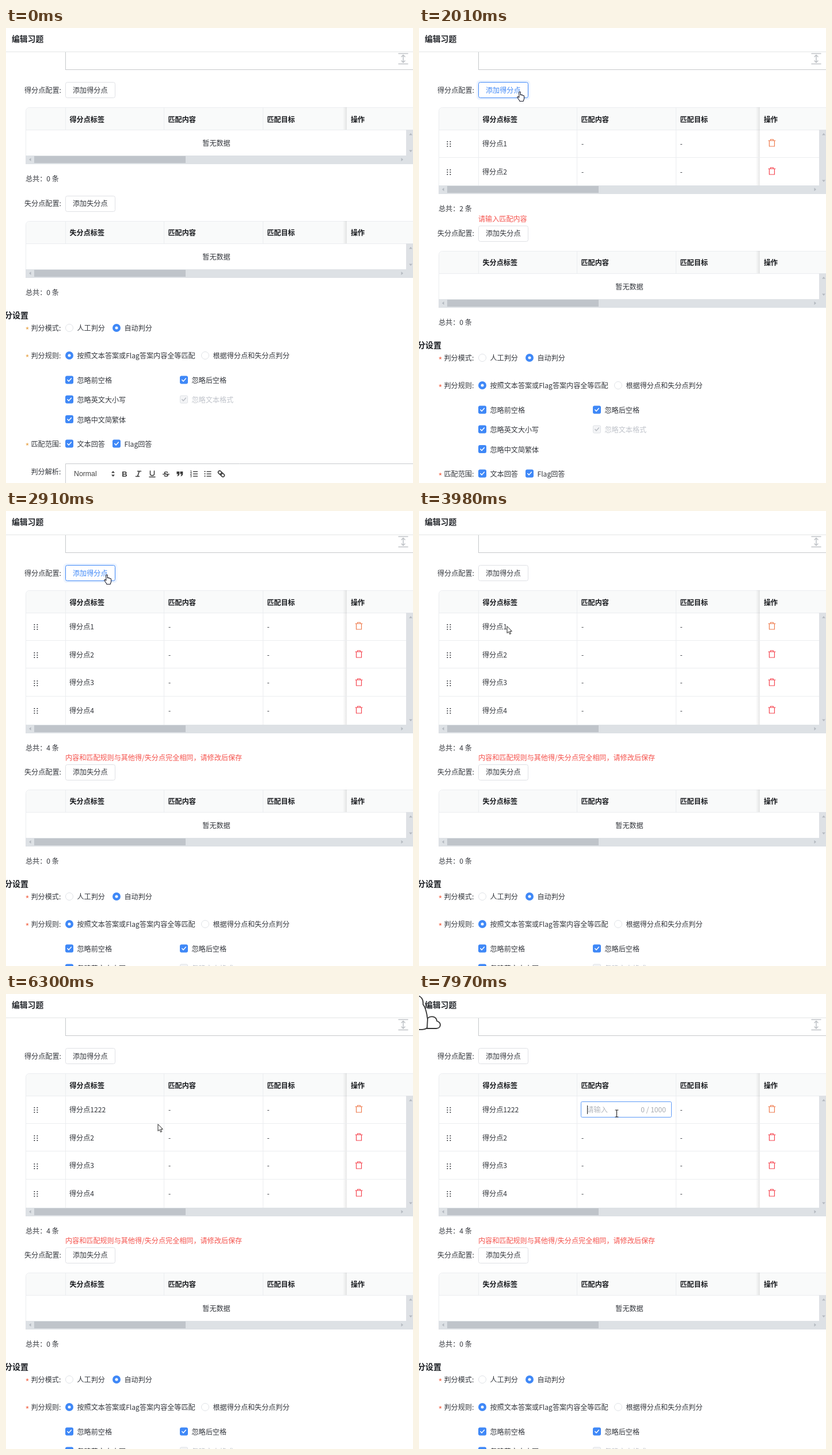
An HTML page with a canvas for the animation above (8000 ms loop, 707 px wide and 792 px high).

```html
<!DOCTYPE html>
<html lang="zh-CN">
<head>
<meta charset="utf-8">
<style>
html, body { margin: 0; width: 100%; height: 100%; overflow: hidden; background: #fff; }
canvas { display: block; }
</style>
</head>
<body>
<canvas id="stage" width="707" height="792"></canvas>
<script>
const c = document.getElementById('stage').getContext('2d');
const LOOP = 8000, SIZE = 12.1, ROW = 48.65, EMPTY = 45.2;
const BLUE = '#3f88f7', INK = '#34373d', LINE = '#ebedf0';
const SANS = '"Noto Sans CJK SC", "Noto Sans CJK", "Noto Sans", sans-serif';

// Moments of the story, in ms
const CLICKS = [1640, 1895, 2250, 2790];
const ERROR_AT = 1780, DUPLICATE_AT = 2060;
const EDITS = [
  { x: 110, open: 3985, ime: 4795, close: 5900 },
  { x: 281.5, open: 7325, ime: 7835, close: LOOP },
];
const KEYS = [5130, 5260, 5390];

// Pointer hot spot: time, x, y
const PATH = [
  [170, 449, 5], [480, 335, 62], [740, 188, 136], [940, 160, 112], [1050, 160, 112],
  [1300, 153, 107], [1640, 153, 107], [1850, 175, 111], [2960, 175, 111], [3300, 166, 165],
  [3580, 153, 209], [3620, 153, 209], [3680, 153, 201], [4150, 153, 201], [4740, 191.5, 200.5],
  [5410, 191.5, 200.5], [5560, 259, 226], [5800, 290, 248], [5950, 290, 248], [6280, 264, 227],
  [6330, 264, 227], [6400, 268, 209], [6800, 364, 203], [7210, 343.5, 208], [8000, 343.5, 208],
];

function pointer(t) {
  const i = PATH.findIndex(p => p[0] > t);
  if (i < 1) return null;
  const [a, b] = [PATH[i - 1], PATH[i]];
  let k = (t - a[0]) / (b[0] - a[0]);
  k = k * k * (3 - 2 * k);
  return { x: a[1] + (b[1] - a[1]) * k, y: a[2] + (b[2] - a[2]) * k };
}
const within = (p, x, y, w, h) => p && p.x >= x && p.x <= x + w && p.y >= y && p.y <= y + h;

// Drawing helpers
function rect(x, y, w, h, fill) {
  c.fillStyle = fill;
  c.fillRect(x, y, w, h);
}
function text(s, x, y, { color = INK, size = SIZE, weight = 350, align = 'left', font = SANS } = {}) {
  c.font = `${weight} ${size}px ${font}`;
  c.textAlign = align;
  c.fillStyle = color;
  c.fillText(s, x, y + size * .38);
}
function box(x, y, w, h, r, fill, stroke, width = 1) {
  c.beginPath();
  c.roundRect(x, y, w, h, r);
  paint(fill, stroke, width);
}
function circle(x, y, r, fill, stroke) {
  c.beginPath();
  c.arc(x, y, r, 0, 7);
  paint(fill, stroke, 1);
}
function path(d, x, y, fill, stroke, width = 1) {
  c.save();
  c.translate(x, y);
  c.lineWidth = width;
  c.lineJoin = c.lineCap = 'round';
  const p = new Path2D(d);
  if (fill) { c.fillStyle = fill; c.fill(p); }
  if (stroke) { c.strokeStyle = stroke; c.stroke(p); }
  c.restore();
}
function paint(fill, stroke, width) {
  if (fill) { c.fillStyle = fill; c.fill(); }
  if (stroke) { c.strokeStyle = stroke; c.lineWidth = width; c.stroke(); }
}

function button(label, y, hover, wave) {
  if (wave > 0 && wave < 1) {
    const g = 2 + 4 * wave;
    box(103 - g, y - 14 - g, 87 + 2 * g, 28 + 2 * g, 4 + g / 2, `rgba(63,136,247,${.12 * (1 - wave)})`);
  }
  box(103.5, Math.round(y - 14) + .5, 86, 27, 3, '#fff', hover ? BLUE : '#dfe1e5');
  text(label, 116, y, { color: hover ? BLUE : INK });
}

function trash(y, color) {
  path('M-6 -4.5H6M-2.5 -4.5V-6.5H2.5V-4.5M-4.5 -4.5V5.5H4.5V-4.5', 613, y, null, color, 1.2);
}

function scrollbars(top, bottom) {
  rect(695, top, 12, bottom - top, '#dee1e5');
  rect(34, bottom, 673, 15, '#dde1e5');
  rect(49, bottom + 1, 263, 12, '#bfc4ca');
  const grey = '#b4b9c0', mid = bottom + 7;
  path('M-3 1.5L0 -2L3 1.5Z', 703, top + 8, grey);
  path('M-3 -1.5L0 2L3 -1.5Z', 703, bottom - 8, grey);
  path('M1.5 -3L-2 0L1.5 3Z', 42, mid, grey);
  path('M-1.5 -3L2 0L-1.5 3Z', 688, mid, grey);
}

// One settings block; y is the centre line of its label
function section(kind, y, rows, hover, wave) {
  text(kind + '分点配置:', 32, y);
  button('添加' + kind + '分点', y, hover, wave);
  const head = Math.round(y + 30), top = head + 39;
  const bottom = Math.round(top + (rows.length ? rows.length * ROW : EMPTY));
  const lineEnd = rows.length ? bottom : top;
  box(34.5, head + .5, 680, bottom - head, [6, 0, 0, 0], '#fff', LINE);
  box(35, head + 1, 680, 38, [6, 0, 0, 0], '#f9fafa');
  rect(35, top, 672, 1, LINE);
  const columns = [[103, kind + '分点标签'], [274, '匹配内容'], [446, '匹配目标']];
  for (const [x, name] of columns) {
    rect(x, head, 1, lineEnd - head, LINE);
    text(name, x + 7.5, y + 51, { weight: 700, color: '#17191d' });
  }
  const shade = c.createLinearGradient(585, 0, 592, 0);
  shade.addColorStop(0, 'rgba(0,0,0,0)');
  shade.addColorStop(1, 'rgba(0,0,0,.09)');
  rect(585, head, 7, lineEnd - head, shade);
  text('操作', 599, y + 51, { weight: 700, color: '#17191d' });

  rows.forEach((name, i) => {
    const mid = top + ROW * (i + .5);
    if (i) rect(35, Math.round(top + ROW * i) - 1, 660, 1, LINE);
    for (let d = 0; d < 6; d++) rect(48.5 + d % 2 * 5, Math.round(mid) - 4 + (d >> 1) * 4, 1.8, 1.8, '#3a3d42');
    text(name, 110, mid);
    text('-', 282, mid);
    text('-', 453.5, mid);
    trash(Math.round(mid) - .5, i ? '#f5444f' : '#ee7b4e');
  });
  if (!rows.length) text('暂无数据', 365.5, y + 92.5, { align: 'center' });
  scrollbars(top, bottom);
  text(`总共：${rows.length} 条`, 34, bottom + 40.4);
  return y + 197.5 + (rows.length ? rows.length * ROW - EMPTY : 0);
}

function radio(label, x, y, on) {
  circle(x, y - .5, on ? 7 : 6.5, on ? BLUE : '#fff', on ? null : '#e0e3e7');
  if (on) circle(x, y - .5, 2.5, '#fff');
  text(label, x + 13.5, y);
}
function check(label, x, y, off) {
  box(x + .5, y - 7.5, 13, 13, 2, off ? '#f3f4f6' : BLUE, off ? '#dfe2e6' : BLUE);
  path('M-3.2 0L-1 2.4L3.4 -2.4', x + 7, y - 1, null, off ? '#b9bdc4' : '#fff', 1.5);
  text(label, x + 20.5, y, { color: off ? '#c0c4cb' : INK });
}

function toolbar(y) {
  const ink = '#3c3c3c', arial = '"Liberation Sans", sans-serif';
  const letter = (s, x) => text(s, x, y + .5, { color: ink, size: 13, weight: 700, font: arial, align: 'center' });
  text('Normal', 118, y - 1, { color: '#444', size: 12.3, weight: 400, font: arial });
  path('M-3 -1.5L0 -5L3 -1.5ZM-3 1.5L0 5L3 1.5Z', 186, y, ink);
  letter('B', 206);
  path('M-1.5 -4.5H4.5M-4.5 4.5H1.5M1.5 -4.5L-1.5 4.5', 230, y, null, ink, 1.6);
  path('M-3.5 -5V0C-3.5 4 3.5 4 3.5 0V-5M-5 5.5H5', 254, y, null, ink, 1.5);
  letter('S', 278);
  rect(272, y, 12, 1.3, ink);
  for (const x of [299, 305])
    path('M-2.5 -4H2.3V0C2.3 2 1 4 -1.5 4.5L-1 2.5L0 .5H-2.5Z', x, y, ink);
  for (let i = -1; i < 2; i++) {
    text(i + 2, 320, y + i * 4.3, { color: ink, size: 5, weight: 700, font: arial });
    rect(325, y + i * 4 - .5, 8, 1.4, ink);
    circle(345.5, y + i * 4, 1.1, ink);
    rect(348.5, y + i * 4 - .5, 8, 1.4, ink);
  }
  c.save();
  c.translate(374, y);
  c.rotate(.75);
  box(-6.5, -2.5, 7.5, 5, 2.5, null, ink, 1.6);
  box(-1, -2.5, 7.5, 5, 2.5, null, ink, 1.6);
  c.restore();
}

function settings(d, star) {
  const label = (s, y) => {
    text('*', 33.5, y + 3.5, { color: star, size: 15 });
    text(s + ':', 43.5, y);
  };
  text('分设置', -3, 499.5 + d, { size: 14, weight: 700, color: '#1c1f24' });
  label('判分模式', 522.5 + d);
  radio('人工判分', 110, 522.5 + d);
  radio('自动判分', 192, 522.5 + d, true);
  label('判分规则', 570.5 + d);
  radio('按照文本答案或Flag答案内容全等匹配', 110, 570.5 + d, true);
  radio('根据得分点和失分点判分', 346, 570.5 + d);
  check('忽略前空格', 103, 613.5 + d);
  check('忽略后空格', 302, 613.5 + d);
  check('忽略英文大小写', 103, 647.5 + d);
  check('忽略文本格式', 302, 647.5 + d, true);
  check('忽略中文简繁体', 103, 682 + d);
  label('匹配范围', 724.5 + d);
  check('文本回答', 103, 724.5 + d);
  check('Flag回答', 185, 724.5 + d);
  text('判分解析:', 43.5, 772.5 + d);
  box(103.5, 758.5 + d, 700, 200, 0, null, '#c9cbce');
  toolbar(776 + d);
}

function header() {
  rect(103, 42, 1, 31, '#c6c8cb');
  rect(103, 72, 604, 1, '#c6c8cb');
  path('M-8 -9H8M-8 9H8M0 -6V6M-3 -3.5L0 -6.5L3 -3.5M-3 3.5L0 6.5L3 3.5', 690, 53.5, null, '#bfc2c6', 1.5);
  rect(0, 41, 707, 1, '#e3e6e6');
  text('编辑习题', 10, 18.5, { size: 13.8, weight: 700, color: '#24272c' });
}

function field(edit, value, limit, hover, t) {
  const { x, ime } = edit, y = 201.5;
  const left = Math.floor(x);
  rect(left + 1, 186, 156, 31, '#fff');
  box(left + .5, 187.5, 157, 27, 2, '#fff', '#5c9af8');
  text(value || '请输入', x + 10, y, { color: value ? INK : '#b3b7be' });
  const end = value ? c.measureText(value).width : 0;
  const phase = ((t - ime) % 1060 + 1060) % 1060;
  if (phase < 530) rect(Math.round(x + 10 + end), 194, 1, 15, '#222');
  text(`${value.length} / ${limit}`, x + 147.5, y, { color: '#a4a8ae', align: 'right' });
  if (value && hover) {
    circle(x + 104.5, 201, 5, '#b9bdc3');
    path('M-1.7 -1.7L1.7 1.7M1.7 -1.7L-1.7 1.7', x + 104.5, 201, null, '#fff', 1.1);
  }
}

function mascot() {
  path('M-4 3C4 3 8 10 7 18C13 26 16 44 15 57C14 62 6 62 -4 62Z', 0, 0, '#fff', '#333', 1.8);
  path('M15 42C20 38 30 38 31 47C40 50 38 60 30 60H14Z', 0, 0, '#fff', '#333', 1.8);
}

const CURSORS = {
  arrow: ['M0 0V11.5L2.7 9L4.6 13.4L6.6 12.5L4.7 8.3H8Z', '#fff', '#222', 1],
  hand: ['M-1.2 10V1.2C-1.2 -.5 1.3 -.5 1.3 1.2V5.5C2 4.8 3.4 5 3.6 6C4.4 5.3 5.6 5.6 5.8 6.6C6.8 6.2 7.6 6.8 7.6 7.8V11.5C7.6 13.5 6.5 14.5 6.2 16.5H0C-.5 14.5 -2.5 12.5 -4 10.3C-4.6 9 -3.4 8 -2.4 8.8Z', '#fff', '#1d2030', 1.1],
  beam: ['M-2.5 -6H-.7L0 -5.5L.7 -6H2.5M0 -5.5V5.5M-2.5 6H-.7L0 5.5L.7 6H2.5', null, '#222', 1.1],
};

function draw(t) {
  rect(0, 0, 707, 792, '#fff');
  const p = pointer(t);
  const count = CLICKS.filter(k => t >= k).length;
  const typed = '得分点1' + '2'.repeat(KEYS.filter(k => t >= k).length);
  const rows = Array.from({ length: count }, (_, i) => i ? '得分点' + (i + 1) : typed);
  const hover = within(p, 103, 94, 87, 28);
  const wave = count ? (t - CLICKS[count - 1]) / 450 : 0;

  header();
  const next = section('得', 108, rows, hover, wave);
  if (t >= ERROR_AT)
    text(t < DUPLICATE_AT ? '请输入匹配内容' : '内容和匹配规则与其他得/失分点完全相同，请修改后保存', 103, next - 25.5, { color: '#f5524c' });
  section('失', next, [], false, 0);
  settings(Math.round(next - 305.5), count ? '#f4694c' : '#e9a64c');

  const edit = EDITS.find(e => t >= e.open && t < e.close);
  const inField = edit && within(p, edit.x, 188, 158, 27);
  if (edit) {
    const first = edit === EDITS[0];
    field(edit, first ? typed : '', first ? 10 : 1000, inField, t);
    if (t >= edit.ime) mascot();
  }
  if (p) {
    const [d, fill, stroke, width] = CURSORS[hover ? 'hand' : inField ? 'beam' : 'arrow'];
    path(d, p.x, p.y, fill, stroke, width);
  }
}

const start = performance.now();
function tick() {
  draw((performance.now() - start) % LOOP);
  requestAnimationFrame(tick);
}
tick();
</script>
</body>
</html>
```
